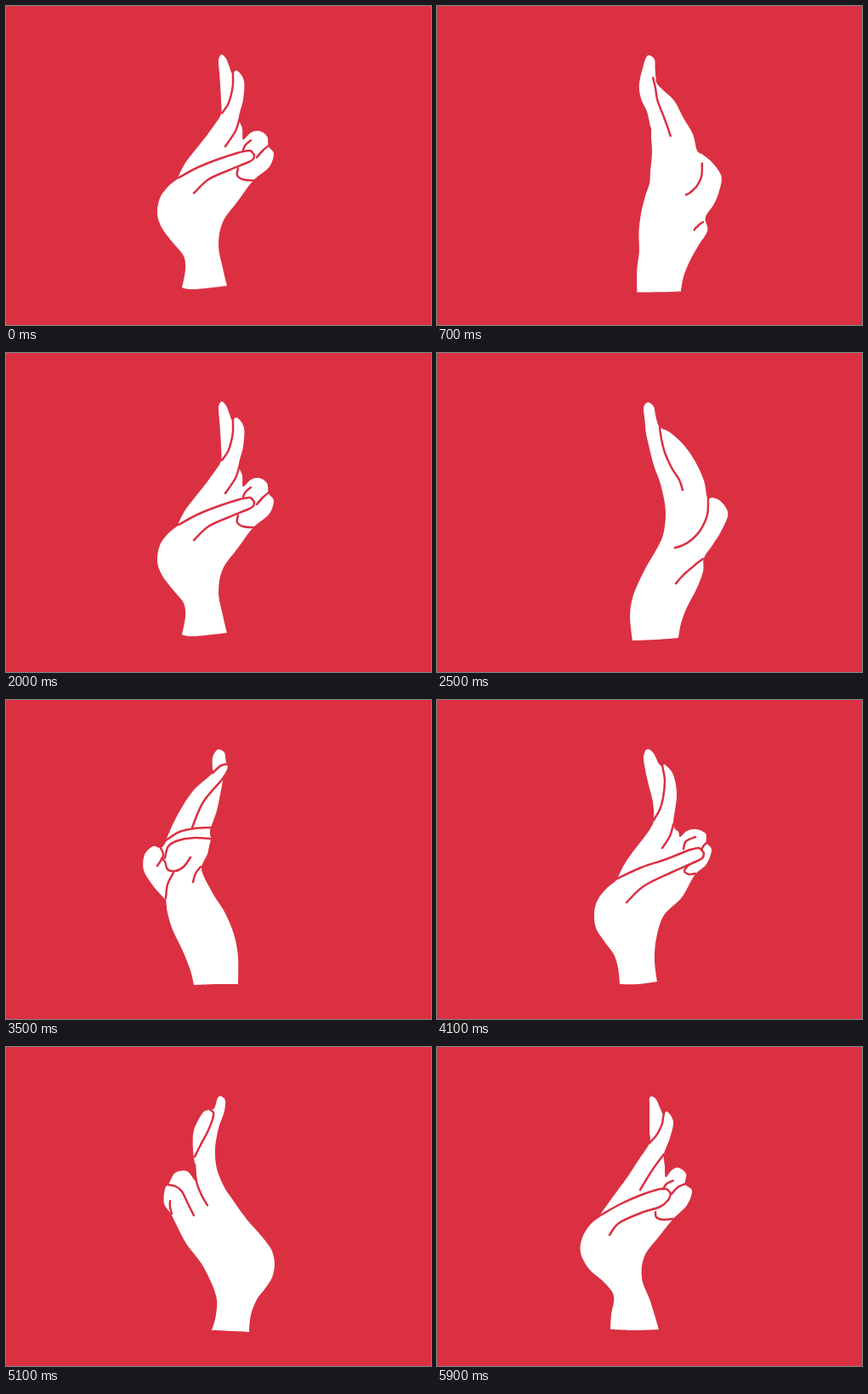
Write an HTML page with a canvas that moves like this. It is 500 px wide and 375 px high and loops after 6000 ms.

```html
<!DOCTYPE html>
<html lang="en">
<head>
<meta charset="utf-8">
<title>Turning hand</title>
<style>
  html, body { margin: 0; height: 100%; overflow: hidden; background: #db3042; }
  canvas { display: block; }
</style>
</head>
<body>
<canvas id="stage" width="500" height="375"></canvas>
<script>
const STEP = 100, TURN = 20, RED = '#db3042';
const CORNERS = [21, 23]; // wrist corners in the outline
const ctx = document.getElementById('stage').getContext('2d');

// Poses are keyed by step within one turn; a single point is a collapsed line.
const outline = cyclic({
  0: `254,57 259,62 263,72 266,79 272,76 280,88 279,110 274,131 278,144 279,157 288,149
    298,147 307,153 309,165 315,174 309,190 291,205 273,229 255,254 250,281 255,308 260,329
    221,333 207,331 211,310 209,294 197,279 184,262 178,245 181,226 190,213 202,203 203,200
    210,186 222,170 234,155 245,140 253,127 253,110 252,92 251,78 250,66 251,60`,
  1: `249,58 255,63 261,75 265,78 268,76 278,88 282,112 278,146 284,155 286,161 294,154
    305,152 316,157 317,168 323,176 317,193 303,206 288,232 267,253 258,280 256,306 259,331
    237,334 215,334 213,315 208,299 197,284 187,268 185,250 189,235 199,222 211,212 213,208
    220,194 230,179 241,165 251,151 255,141 254,120 249,100 245,82 243,68 245,60`,
  5: `249,58 255,63 257,73 260,84 263,88 275,94 291,109 304,128 314,150 318,170 324,170
    332,173 340,182 342,192 334,210 324,226 314,241 313,257 305,278 294,299 287,318 284,335
    256,337 230,338 227,310 230,288 237,270 247,250 257,233 265,217 268,203 269,190 268,177
    265,162 261,148 256,135 252,121 249,108 246,95 245,85 244,75 243,65 245,60`,
  11: `253,58 258,63 257,75 254,84 251,92 248,105 246,120 247,138 251,152 258,167 267,180
    276,193 286,206 296,217 306,229 313,240 316,255 313,271 304,285 295,297 288,315 286,335
    264,334 242,333 247,315 247,292 232,258 212,231 200,208 194,196 186,184 187,167 192,160
    199,148 213,146 223,157 222,138 220,120 221,98 231,78 238,74 245,72 249,60`,
  15: `251,58 257,62 259,73 262,77 261,83 256,91 253,106 248,130 241,150 240,157 241,163
    239,172 237,181 233,189 230,196 231,203 236,214 246,232 257,249 268,275 273,302 273,334
    247,334 221,335 217,318 208,295 196,270 190,250 188,234 186,233 172,217 162,200 163,182
    173,172 182,174 188,167 191,158 203,133 220,107 243,86 243,81 243,68 247,60`,
  19: `253,58 258,62 263,73 266,79 271,76 278,88 274,107 267,126 268,140 269,153 276,145
    284,142 293,149 292,161 300,169 294,186 278,202 261,223 244,246 241,272 251,299 261,332
    232,333 204,332 205,315 208,293 197,277 179,261 169,242 171,224 181,208 194,198 193,196
    202,183 213,168 224,153 237,133 250,113 250,100 250,87 250,75 250,66 250,60`
});

const lines = [
  // between the raised fingers
  cyclic({
    0: '267,78 267,83 267,92 265,104 261,116 254,126',
    1: '265,76 266,82 268,95 266,115 262,129 255,141',
    5: '262,88 264,101 268,117 276,135 285,149 289,161',
    11: '240,74 244,77 243,85 237,100 229,115 222,129',
    15: '243,86 253,77 262,77 256,91 232,120 219,150',
    19: '267,78 266,83 265,90 262,97 258,104 250,113'
  }),
  // finger fold
  track({ 17: '262,140', 19: '267,126 253,145 239,168', 20: '275,131 270,147 258,165',
    21: '278,146 274,160 265,174', 24: '290,140' }),
  // thumb, upper and lower edge
  track({ 17: '200,180', 19: '194,197 215,185 240,174 262,167 270,167 275,172',
    20: '203,202 225,190 250,180 275,172 287,170 292,175',
    21: '212,210 240,197 270,187 295,177 308,174 314,180',
    25: '280,229 289,226 299,220 310,208 318,190 319,170', 29: '300,210' }),
  track({ 17: '214,207', 19: '275,172 272,180 262,188 240,195 214,207 203,221',
    20: '292,175 291,180 284,184 262,193 238,204 221,220',
    21: '314,180 312,186 300,192 275,203 243,219 223,238',
    25: '313,242 306,247 299,253 293,258 286,265 281,271', 28: '313,258' }),
  // bent fingers, front
  track({ 17: '262,165', 19: '278,157 270,161 266,167', 20: '288,158 282,163 279,169',
    21: '304,161 293,166 290,175', 23: '305,170' }),
  track({ 17: '275,172', 19: '292,161 283,165 276,173', 20: '309,164 302,170 295,178',
    21: '317,168 314,171 311,176', 23: '325,175' }),
  track({ 17: '257,205', 19: '257,194 258,200 266,203 279,202',
    20: '273,191 272,199 279,204 291,205', 21: '296,194 291,201 297,205 304,204', 23: '308,208' }),
  // bent fingers, back and side
  track({ 8: '245,150', 11: '222,138 224,158 230,174 237,186',
    15: '188,165 204,155 222,151 241,150', 18: '235,150' }),
  track({ 8: '225,190', 11: '191,162 200,164 207,170 214,184 221,198',
    15: '187,186 191,172 203,165 222,162 241,163', 18: '225,165' }),
  track({ 9: '200,190', 11: '193,181 193,188 195,196', 15: '182,174 185,183 178,195', 18: '175,200' }),
  track({ 13: '200,195', 15: '183,186 187,190 190,199 199,201 209,196 217,185', 18: '240,190' }),
  track({ 13: '230,200', 15: '229,196 223,204 220,214', 17: '230,200' }),
  track({ 13: '195,210', 15: '188,233 190,217 197,203', 17: '190,215' })
];

function track(poses) {
  const keys = Object.entries(poses).map(([at, text]) => ({
    at: +at,
    points: text.trim().split(/\s+/).map(pair => pair.split(',').map(Number))
  }));
  const count = Math.max(...keys.map(key => key.points.length));
  for (const key of keys) {
    if (key.points.length < count) key.points = Array(count).fill(key.points[0]);
  }
  return keys;
}

function cyclic(poses) {
  const keys = track(poses);
  return [-TURN, 0, TURN].flatMap(shift => keys.map(key => ({ ...key, at: key.at + shift })));
}

// Monotone cubic interpolation of every coordinate; null outside the track.
function poseAt(keys, time) {
  const k = keys.findIndex((key, i) => keys[i + 1] && key.at <= time && time <= keys[i + 1].at);
  if (k < 0) return null;
  const span = keys[k + 1].at - keys[k].at, u = (time - keys[k].at) / span;
  const slope = (i, p, axis) => {
    const value = key => key.points[p][axis];
    const before = keys[i - 1] || keys[i], after = keys[i + 1] || keys[i];
    const turns = (value(keys[i]) - value(before)) * (value(after) - value(keys[i])) < 0;
    return turns ? 0 : (value(after) - value(before)) / (after.at - before.at);
  };
  return keys[k].points.map((point, p) => point.map((a, axis) => {
    const b = keys[k + 1].points[p][axis];
    const ease = u * u * (3 - 2 * u);
    return a + (b - a) * ease + span * u * (1 - u) *
      ((1 - u) * slope(k, p, axis) - u * slope(k + 1, p, axis));
  }));
}

function trace(points, closed, corners = []) {
  const n = points.length;
  const index = i => closed ? (i + n) % n : Math.min(Math.max(i, 0), n - 1);
  const handle = (i, axis) => corners.includes(index(i)) ? 0 :
    (points[index(i + 1)][axis] - points[index(i - 1)][axis]) / 6;
  ctx.beginPath();
  ctx.moveTo(...points[0]);
  for (let i = 0; i < (closed ? n : n - 1); i++) {
    const [x0, y0] = points[i], [x1, y1] = points[index(i + 1)];
    ctx.bezierCurveTo(x0 + handle(i, 0), y0 + handle(i, 1),
      x1 - handle(i + 1, 0), y1 - handle(i + 1, 1), x1, y1);
  }
}

function draw() {
  const step = Math.floor(performance.now() / STEP) % TURN;
  ctx.fillStyle = RED;
  ctx.fillRect(0, 0, 500, 375);
  ctx.fillStyle = '#fff';
  trace(poseAt(outline, step), true, CORNERS);
  ctx.fill();

  ctx.strokeStyle = RED;
  ctx.lineWidth = 2.5;
  ctx.lineCap = ctx.lineJoin = 'round';
  for (const line of lines) {
    const points = poseAt(line, step) || poseAt(line, step + TURN);
    if (!points) continue;
    trace(points, false);
    ctx.stroke();
  }
  requestAnimationFrame(draw);
}
draw();
</script>
</body>
</html>
```
